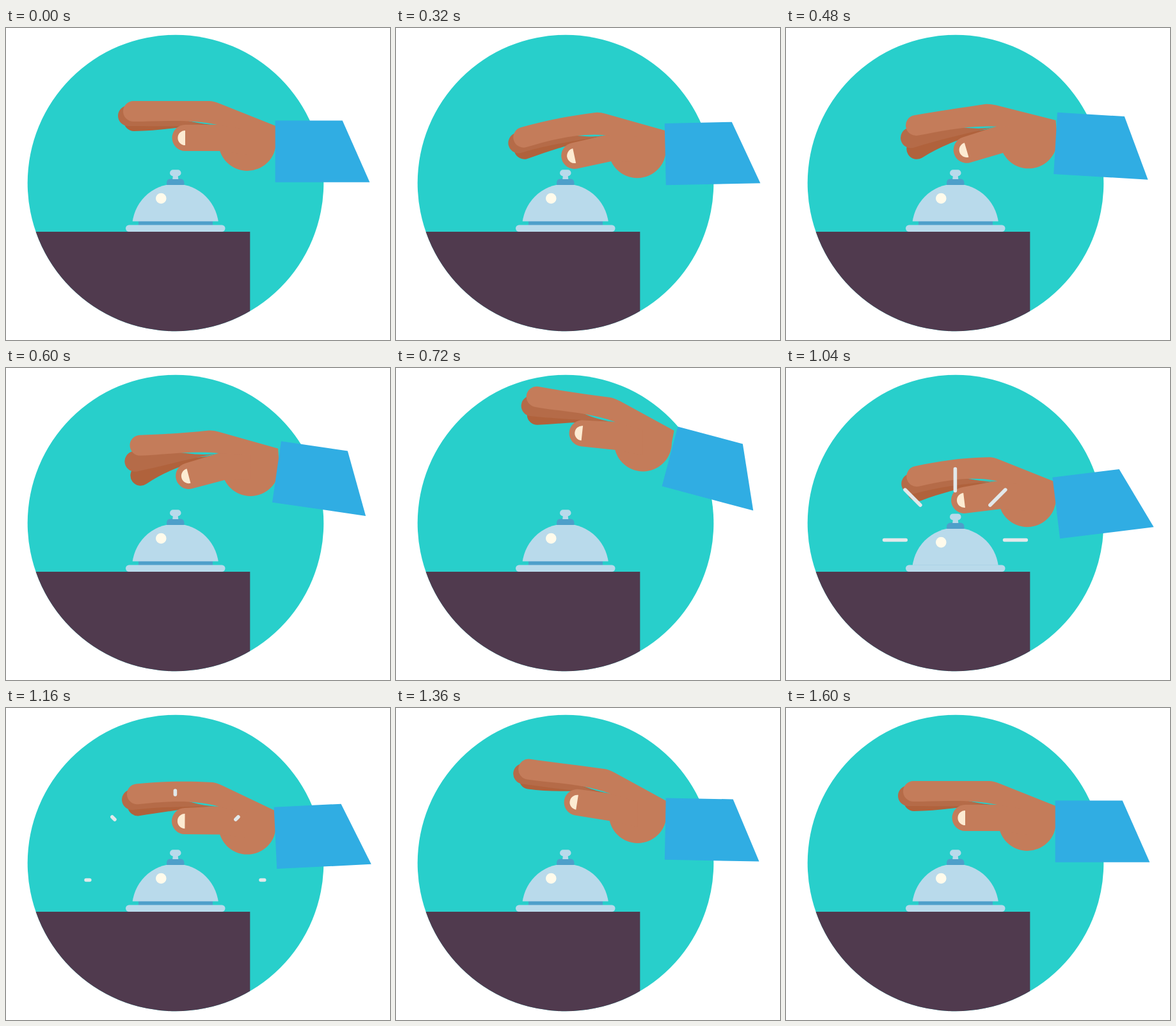
An HTML page that plays this animation: 600 by 487 pixels, repeating every 2080 ms.

```html
<!DOCTYPE html>
<html lang="en">
<head>
<meta charset="utf-8">
<title>Desk bell</title>
<style>
html, body { margin: 0; width: 100%; height: 100%; overflow: hidden; background: #fff; }
svg { display: block; width: 100%; height: 100%; }
</style>
</head>
<body>
<svg viewBox="0 0 600 487">
  <defs>
    <clipPath id="disc"><circle cx="265" cy="242" r="231.3"/></clipPath>
    <clipPath id="rim"><rect x="180" y="200" width="170" height="101.7"/></clipPath>
  </defs>
  <circle cx="265" cy="242" r="231.3" fill="#28cfcb"/>
  <rect y="318" width="381.3" height="169" fill="#503a4e" clip-path="url(#disc)"/>

  <rect x="207" y="301" width="116" height="7" fill="#4e9fca"/>
  <g id="dome" fill="#b9daeb">
    <circle cx="264.7" cy="311" r="67.6" clip-path="url(#rim)"/>
    <path d="M251 245V242Q251 235.5 257.5 235.5H272Q278.5 235.5 278.5 242V245Z" fill="#4e9fca"/>
    <path d="M261 229H268.5L269.3 236H260.2Z"/>
    <rect x="256" y="221.3" width="17.5" height="10" rx="5"/>
    <circle cx="242.3" cy="266" r="8.3" fill="#fffbec"/>
  </g>
  <rect x="187" y="307.5" width="155.5" height="10.5" rx="5.2" fill="#b9daeb"/>

  <g fill="#c47c5a">
    <path id="ring" fill="#b0623c"/>
    <path id="middle" fill="#b56b48"/>
    <path id="hand"/>
    <path id="thumb"/>
    <path id="nail" d="M0 -11.6A11.6 11.6 0 0 0 0 11.6Z" fill="#fdebd2"/>
  </g>
  <path id="sleeve" d="M420.7 144.5H525.7L568.3 240.8H420.7Z" fill="#30ade3"/>
  <path id="marks" fill="none" stroke="#e2e8ea" stroke-width="5.6" stroke-linecap="round"/>
</svg>
<script>
const LOOP = 2080, STEP = 40;

// Key poses: time, arm swing, wrist bend, finger curl, finger spread
const poses = [
  [40, 0, 0, 0, 0],
  [200, -2.3, -1, -2, 0],
  [320, -1.2, -6, -10, 0.1],
  [600, 8.3, -6, 4, 1],
  [700, 17, 6.5, 1, 0.4],
  [840, -7, 2, 21, 0.75],
  [1040, -7, 0, -13, 0.25],
  [1280, 1.8, 8, 0, 0],
  [1360, 1.1, 7, 1, 0],
  [1600, 0, 0, 0, 0]
];

const set = (id, name, value) => document.getElementById(id).setAttribute(name, value);
const clamp = (v, lo, hi) => Math.max(lo, Math.min(hi, v));
const add = (p, x, y) => [p[0] + x, p[1] + y];
const mix = (p, q, u) => p.map((v, k) => v + (q[k] - v) * u);
const pt = p => p[0].toFixed(2) + ' ' + p[1].toFixed(2) + ' ';

function smooth(v) {
  v = clamp(v, 0, 1);
  return v * v * (3 - 2 * v);
}

// Offset p by (x, y) turned through a degrees
function turn(p, a, x, y) {
  const r = a * Math.PI / 180, c = Math.cos(r), s = Math.sin(r);
  return add(p, x * c - y * s, x * s + y * c);
}

function slope(i, k) {
  const a = poses[i - 1], b = poses[i + 1];
  return a && b ? (b[k] - a[k]) / (b[0] - a[0]) : 0;
}

// Smooth spline through the key poses
function poseAt(t) {
  t = clamp(t, poses[0][0], poses.at(-1)[0]);
  const i = Math.max(1, poses.findIndex(p => p[0] >= t)) - 1;
  const a = poses[i], b = poses[i + 1];
  const d = b[0] - a[0], u = (t - a[0]) / d, v = 1 - u;
  return a.map((p, k) =>
    p * v * v * (1 + 2 * u) + b[k] * u * u * (3 - 2 * u) +
    d * u * v * (v * slope(i, k) - u * slope(i + 1, k)));
}

// Cubic from p leaving at angle a, reaching q at angle b
function curve(p, a, q, b) {
  const h = 0.35 * Math.hypot(q[0] - p[0], q[1] - p[1]);
  return 'C' + pt(turn(p, a, h, 0)) + pt(turn(q, b, -h, 0)) + pt(q);
}

const arc = (r, sweep, to) => `A${r} ${r} 0 0 ${sweep} ${pt(to)}`;

function backFinger(c, a, root, end) {
  const top = turn(c, a, 0, -16), low = turn(c, a, 0, 16);
  return 'M' + pt(root) + curve(root, end + 180, top, a + 180) +
    arc(16, 0, low) + curve(low, a, root, end) + 'Z';
}

function drawHand(t) {
  const [, arm, bend, curl, spread] = poseAt(t);
  const palm = [377 + 0.6 * Math.max(0, arm), 178 - 3.6 * arm - 1.15 * bend];
  const knuckle = turn(palm, bend, -53, -64);
  const root = turn(palm, bend, -47, -27);
  const wrist = turn(palm, bend, 46, -24.5);

  // Fingers swing half as far as their tips turn, and shorten as they bend
  const a = bend + curl, g = bend + 0.1 * a;
  const reach = 128 - 0.2 * Math.abs(curl) - 9 * spread;
  const tip = turn(turn(palm, bend, -50, -45), bend + curl / 2, -reach, -3);
  const top = turn(tip, a, 0, -16), low = turn(tip, a, 0, 16);

  set('sleeve', 'transform', `rotate(${arm} 633 193)`);
  set('hand', 'd',
    'M' + pt(top) + curve(top, a, turn(knuckle, g, -6, 0), g) +
    'Q' + pt(knuckle) + pt(mix(knuckle, wrist, 0.1)) +
    'L' + pt(wrist) + pt(add(palm, 45, 0)) + arc(45, 1, add(palm, -45, 0)) +
    'L' + pt(root) + curve(root, g + 192, low, a + 180) + arc(16, 1, top) + 'Z');

  const ringTurn = a - 33 * spread;
  set('middle', 'd', backFinger(add(tip, -8, 7 + 18 * spread), a - 10 * spread, root, g - 4));
  set('ring', 'd', backFinger(add(tip, 1, 15 + 32 * spread), ringTurn, root, (g + ringTurn) / 2));

  const lean = bend + 0.3 * curl - 7 * spread, q = lean * 1.25;
  const pad = turn(palm, lean, -97 + 0.1 * a, -6.5);
  const under = turn(pad, q, 0, 20.5);
  set('thumb', 'd',
    'M' + pt(root) + 'L' + pt(turn(pad, q, 0, -20.5)) + arc(20.5, 0, under) +
    'L' + pt(turn(under, q, 55, 0)) + pt(add(palm, 0, 20)) + pt(add(palm, 0, -20)) + 'Z');
  set('nail', 'transform', `translate(${pt(pad)}) rotate(${q})`);
}

function drawBell(t) {
  const press = 6.1 * smooth((t - 900) / 60) * (1 - smooth((t - 1045) / 80));
  set('dome', 'transform', `translate(0 ${press})`);
}

// Five strokes fly out around the dome; the tails catch up with the heads
function drawMarks(t) {
  const u = (t - 950) / 220, centre = [264.4, 268.5];
  let d = '';
  if (u > 0 && u < 1) {
    const head = 57.5 + 82 * (1 - (1 - u) ** 2), tail = 57.5 + 82 * u ** 1.6;
    for (let a = 180; a <= 360; a += 45)
      d += 'M' + pt(turn(centre, a, tail, 0)) + 'L' + pt(turn(centre, a, head, 0));
  }
  set('marks', 'd', d);
}

function draw() {
  const t = Math.floor(performance.now() % LOOP / STEP) * STEP;
  drawHand(t);
  drawBell(t);
  drawMarks(t);
  requestAnimationFrame(draw);
}
draw();
</script>
</body>
</html>
```
